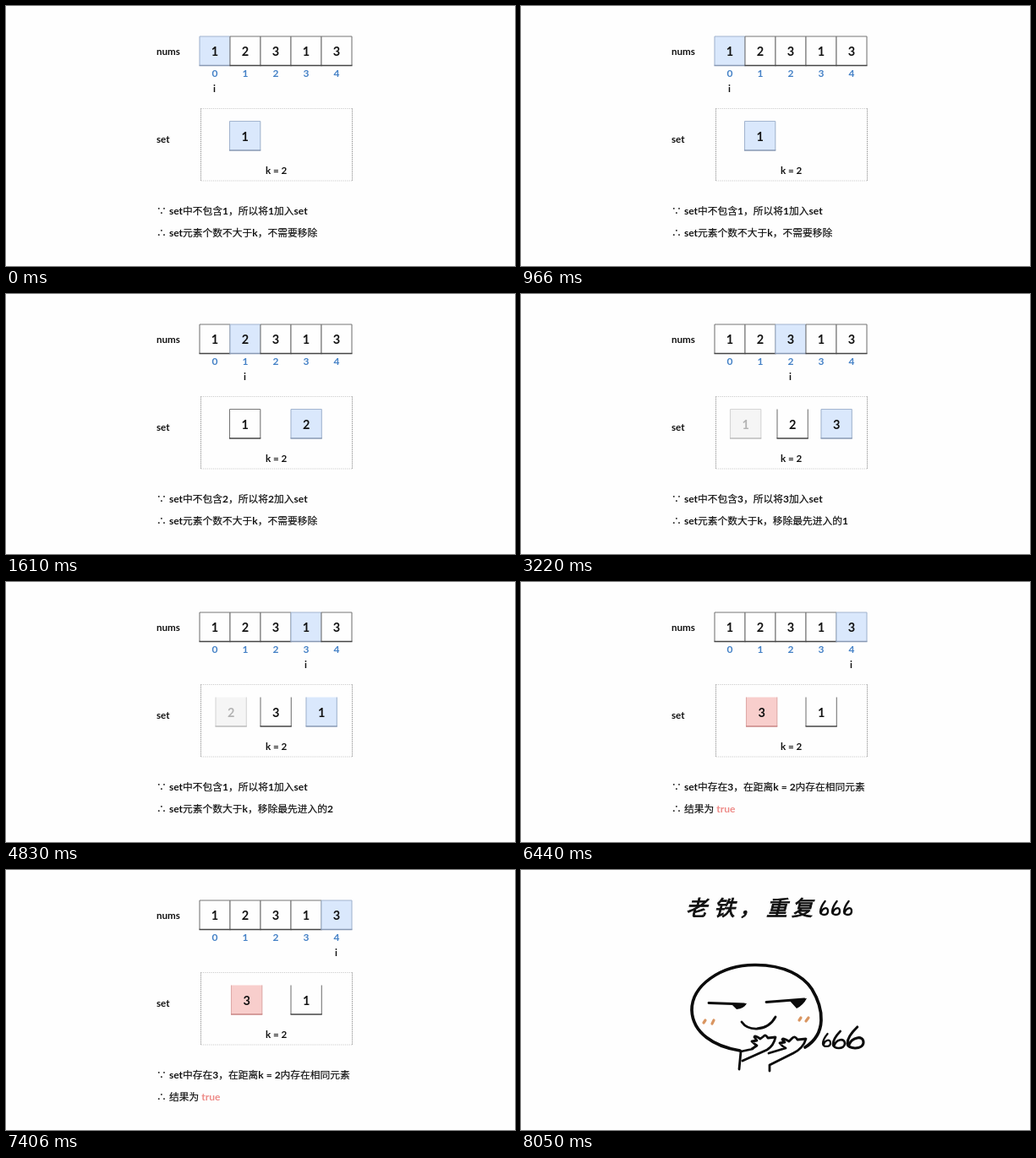
An HTML page that plays this animation: 602x308 px, repeating every 9660 ms.

```html
<!DOCTYPE html>
<html lang="zh">
<head>
<meta charset="utf-8">
<title>Sliding window set</title>
<style>
html, body { margin: 0; width: 100%; height: 100%; overflow: hidden; background: #fefefe; }
svg { display: block; width: 602px; height: 308px; }
text { font: 500 11.75px Lato, 'Noto Sans CJK SC', 'Noto Sans CJK', sans-serif; fill: #111; }
.note { stroke: #111; stroke-width: .2px; }
.note tspan { font-size: 12px; font-weight: 700; stroke: none; }
.latin { font-size: 11.6px; font-weight: 700; }
.digit { font-size: 14.5px; font-weight: 700; text-anchor: middle; }
.index { font-size: 12px; font-weight: 700; text-anchor: middle; fill: #4380c6; }
.title { font-size: 25px; font-style: italic; stroke: #111; stroke-width: .9px; }
.ink { fill: none; stroke: #0b0b0b; stroke-linecap: round; stroke-linejoin: round; }
</style>
</head>
<body>
<svg id="stage" viewBox="0 0 602 308"></svg>
<script>
const STEP = 1610;
const NUMS = [1, 2, 3, 1, 3];
const STYLES = {
  plain: { fill: '#fefefe', side: '#777', base: '#444', ink: '#111' },
  blue: { fill: '#dae8fc', side: '#a3b5cf', base: '#8798b3', ink: '#111' },
  gray: { fill: '#f5f5f5', side: '#d5d5d5', base: '#bbb', ink: '#b3b3b3' },
  red: { fill: '#f8cecc', side: '#dfaaa8', base: '#c98583', ink: '#111' }
};

// Set members: [value, left edge, style, has a top border]
const STEPS = [
  { members: [[1, 264.5, 'blue', true]],
    lines: ['set中不包含1，所以将1加入set', 'set元素个数不大于k，不需要移除'] },
  { members: [[1, 264.5, 'plain', true], [2, 337, 'blue', true]],
    lines: ['set中不包含2，所以将2加入set', 'set元素个数不大于k，不需要移除'] },
  { members: [[1, 247.5, 'gray', true], [2, 303, 'plain'], [3, 355, 'blue', true]],
    lines: ['set中不包含3，所以将3加入set', 'set元素个数大于k，移除最先进入的1'] },
  { members: [[2, 248, 'gray'], [3, 301, 'plain'], [1, 355, 'blue']],
    lines: ['set中不包含1，所以将1加入set', 'set元素个数大于k，移除最先进入的2'] },
  { members: [[3, 266.5, 'red'], [1, 337, 'plain']],
    lines: ['set中存在3，在距离k = 2内存在相同元素', '结果为 true'] }
];

const text = (x, y, content, cls = '') => `<text x="${x}" y="${y}" class="${cls}">${content}</text>`;
const line = (d, color, width = 1) => `<path d="${d}" fill="none" stroke="${color}" stroke-width="${width}"/>`;
const ink = (d, width = 3) => `<path class="ink" d="${d}" stroke-width="${width}"/>`;

// Mixed Chinese and Latin sentence, Latin runs in bold
const note = (x, y, content) => text(x, y, content.replace(/[\w=]+/g, word =>
  `<tspan${word === 'true' ? ' fill="#ee8a87"' : ''}>${word}</tspan>`), 'note');

function cell(value, x, y, style, top, width = 36.3) {
  const s = STYLES[style], bottom = y + 34.5;
  return `<rect x="${x}" y="${y}" width="${width}" height="34.5" fill="${s.fill}"/>`
    + line(`M${x} ${y}V${bottom}M${x + width} ${y}V${bottom}`, s.side, 1.1)
    + (top ? line(`M${x} ${y}H${x + width}`, s.side) : '')
    + line(`M${x - .5} ${bottom}H${x + width + .5}`, s.base, 1.5)
    + `<text x="${x + width / 2}" y="${y + 23}" class="digit" style="fill:${s.ink}">${value}</text>`;
}

function board({ members, lines }, active) {
  const left = i => 229 + i * 36;
  const array = NUMS.map((n, i) =>
    cell(n, left(i), 36, i === active ? 'blue' : 'plain', true, 36) + text(left(i) + 18, 84, i, 'index'));
  const set = members.map(([n, x, style, top]) => cell(n, x, 136.5, style, top));
  return text(178, 58, 'nums', 'latin') + array.join('')
    + text(left(active) + 16, 102, 'i', 'latin')
    + text(178, 162, 'set', 'latin')
    + '<path d="M230.5 121.5H409.5M230.5 207H409.5" stroke="#ccc" stroke-dasharray="1.2 1.2"/>'
    + '<path d="M230.5 121.5V207M409.5 121.5V207" stroke="#888" stroke-dasharray="1.2 1.2"/>'
    + set.join('') + text(307, 199, 'k = 2', 'latin')
    + note(178, 247, '∵') + note(193, 247, lines[0])
    + note(178, 273, '∴') + note(193, 273, lines[1]);
}

// Brush-drawn six, placed by its left edge and baseline
const six = (x, y, w, h) => ink(
  `M${x + w * .62} ${y - h}Q${x} ${y - h * .55} ${x} ${y - h * .22}`
  + `C${x} ${y + h * .08} ${x + w} ${y + h * .08} ${x + w} ${y - h * .27}`
  + `C${x + w} ${y - h * .65} ${x + w * .25} ${y - h * .5} ${x + w * .1} ${y - h * .15}`, 1 + h / 12);

function doodle() {
  const title = [['老', 195], ['铁', 228], ['，', 258], ['重', 290], ['复', 320]];
  return title.map(([c, x]) => text(x, 54, c, 'title')).join('')
    + [354, 368, 382].map(x => six(x, 53, 9, 16)).join('')
    + ink('M259 214C228 209 203 193 202 166C202 137 236 112.5 276 112.5C312 112 334 126 344 141C358 164 362 194 336 210', 3.7)
    + ink('M222 157.5L264 159M290 156.5L335 153', 2.8)
    + '<path d="M248 158L267 158Q264 164 255 165ZM317 154L338 152Q334 160 326 164Z" fill="#0b0b0b"/>'
    + ink('M261 180Q267 188.5 279 188Q294 187 301 174', 2.8)
    + ink('M258 236L260 215L274 212M262 226L291 213Q299 208 301 198L292 199Q289 194 287 197L283 200Q276 195 276 198L279 202L273 203Q276 206 279 208L273 212', 2.8)
    + ink('M294 238V231L322 217Q334 211 337 200L327 201Q324 196 321 199L317 203Q309 198 309 201L312 204L306 205Q309 209 313 211L293 217', 2.8)
    + '<path d="M218 178L216 181M228 178L226 182M331 175L329 178M340 175L337 179" stroke="#d99560" stroke-width="3.2" stroke-linecap="round"/>'
    + six(357, 209, 9, 15) + six(369, 211, 14, 20) + six(386, 211, 19, 25);
}

const scenes = [...STEPS.map(board), doodle()];
const stage = document.getElementById('stage');
stage.innerHTML = scenes.map(s => `<g opacity="0">${s}</g>`).join('');

const share = 1 / scenes.length;
[...stage.children].forEach((scene, i) => scene.animate([
  { opacity: 1, offset: 0 }, { opacity: 1, offset: share },
  { opacity: 0, offset: share }, { opacity: 0, offset: 1 }
], { duration: STEP * scenes.length, delay: STEP * (i - scenes.length), iterations: Infinity }));
</script>
</body>
</html>
```
